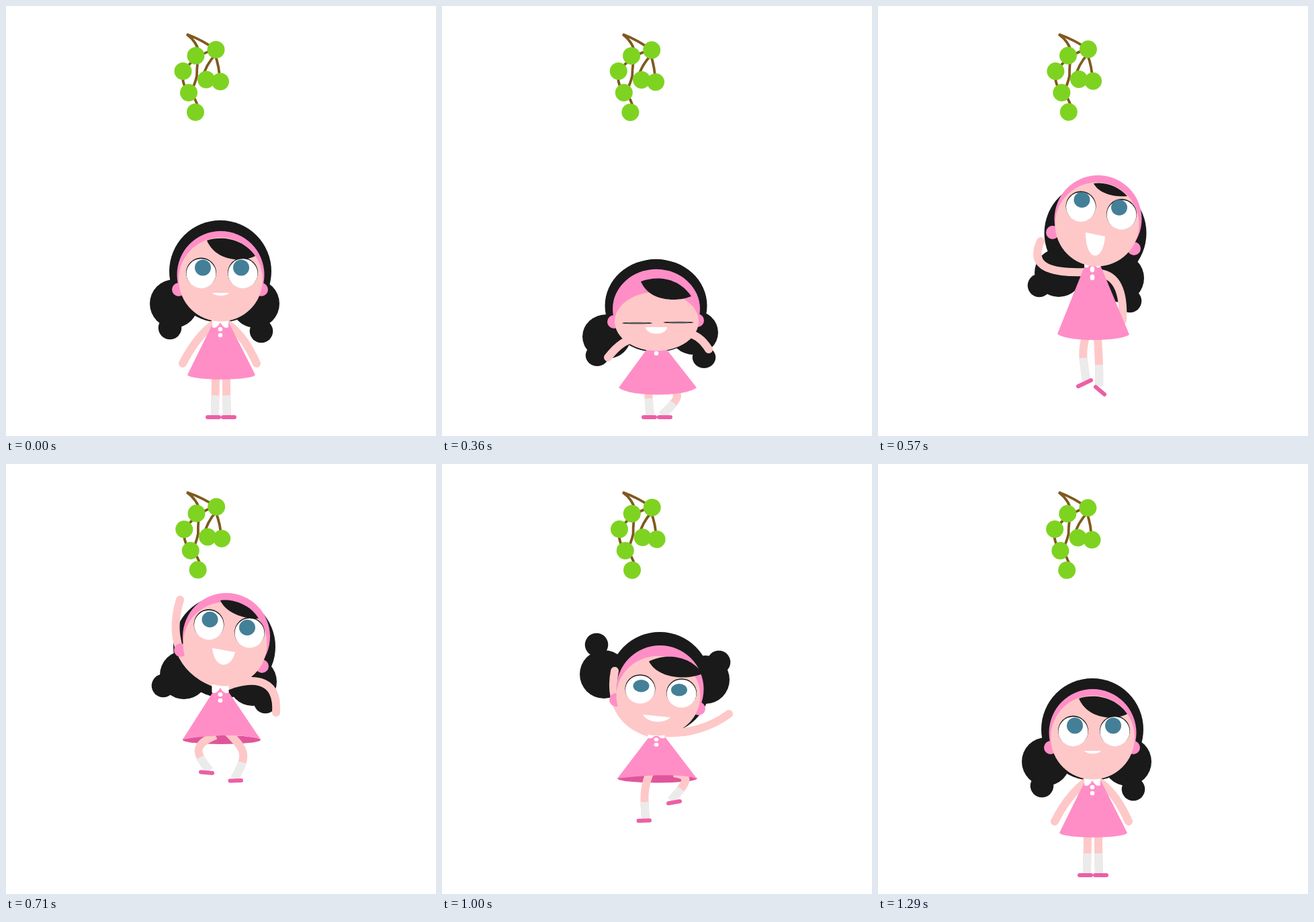
Animation of 640x640 px, one loop 1370 ms. Source, as an HTML page without scripts:

```html
<!DOCTYPE html>
<html lang="en">
<head>
<meta charset="utf-8">
<title>Jumping for grapes</title>
<style>
html, body { margin: 0; width: 100%; height: 100%; overflow: hidden; background: #fff }
svg { display: block; width: 100%; height: 100% }
svg [style] { animation: 1.37s steps(2) -5ms infinite }

.black { fill: #1a1a1a }
.pink { fill: #ff8ec6 }
.skin { fill: #fec8c8 }
.white { fill: #fff }
.iris { fill: #447f98 }
.limb { fill: none; stroke: #fec8c8; stroke-width: 12 }
.arm { stroke-linecap: round }
.sock { stroke: #ebebeb; stroke-dasharray: 100 100 }
.shoe { fill: none; stroke: #ec5fa6; stroke-width: 6; stroke-linecap: round }
.stem { fill: none; stroke: #80591f; stroke-width: 3.8 }
.berries { fill: #7ed321 }
.bunch { transform-origin: 270px 42px }

/* Poses: stand, half crouch (also landing), crouch, take-off, rise, top, fall */
@keyframes bunch {
  0%, to { rotate: 0deg } 10.22% { rotate: .5deg } 21.17%, 31.39% { rotate: .8deg }
  41.61% { rotate: -.9deg } 51.82%, 62.77% { rotate: -1.8deg } 72.99% { rotate: -.5deg }
  83.21%, 94.16% { rotate: .4deg }
}

/* Hair */
@keyframes hair {
  0%, 94.16%, to { translate: 319px 395px; scale: 1 1 }
  10.22%, 83.21% { translate: 319px 421px; scale: 1 .95 }
  21.17%, 31.39% { translate: 318.5px 446px; scale: 1 .91 }
  41.61% { translate: 323.5px 338px; scale: 1 1 }
  51.82% { translate: 325px 272px }
  62.77% { translate: 333px 261px }
  72.99% { translate: 324px 326px; scale: 1 1 }
}
@keyframes bunL {
  0%, 94.16%, to { translate: 250px 443px; scale: 1 1 }
  10.22%, 83.21% { translate: 250px 467px; scale: 1 .96 }
  21.17%, 31.39% { translate: 245px 492px; scale: 1 .92 }
  41.61% { translate: 269px 397px; scale: 1 1 }
  51.82% { translate: 265px 314px }
  62.77% { translate: 254px 228px }
  72.99% { translate: 241px 313px; scale: 1 1 }
}
@keyframes tipL {
  0%, 94.16%, to { translate: 244px 479px; scale: 1 1 }
  10.22%, 83.21% { translate: 238px 499px }
  21.17%, 31.39% { translate: 231px 520px; scale: 1 .92 }
  41.61% { translate: 240px 416px; scale: 1 1 }
  51.82% { translate: 234px 330px }
  62.77% { translate: 241px 201px }
  72.99% { translate: 230px 269px }
}
@keyframes bunR {
  0%, 94.16%, to { translate: 371px 443px; scale: 1 1 }
  10.22%, 83.21% { translate: 371px 465px; scale: 1 .96 }
  21.17%, 31.39% { translate: 375px 486px; scale: 1 .92 }
  41.61% { translate: 360px 405px; scale: 1 1 }
  51.82% { translate: 367px 324px }
  62.77% { translate: 404px 258px }
  72.99% { translate: 392px 321px; scale: 1 1 }
}
@keyframes tipR {
  0%, 94.16%, to { translate: 380px 484px; scale: 1 1 }
  10.22%, 83.21% { translate: 385px 504px }
  21.17%, 31.39% { translate: 390px 523px; scale: 1 .92 }
  41.61% { translate: 375px 439px; scale: 1 1 }
  51.82% { translate: 386px 354px }
  62.77% { translate: 428px 241px }
  72.99% { translate: 412px 295px }
}
@keyframes fringe {
  0%, 94.16%, to { d: path("M299 349C320 342 352 345 371 372C352 382 312 380 299 349") }
  10.22%, 83.21% { d: path("M298 379C320 371 352 374 371 402C351 411 310 410 298 379") }
  21.17%, 31.39% { d: path("M296 410C320 401 352 404 371 432C350 441 308 440 296 410") }
  41.61% { d: path("M321 264C340 261 360 270 371 283C352 285 328 279 321 264") }
  51.82% { d: path("M319 203C340 200 365 211 376 230C355 231 327 222 319 203") }
  62.77% { d: path("M323 224C345 217 380 225 390 250C365 257 331 250 323 224") }
  72.99% { d: path("M308 294C330 282 368 283 388 312C365 322 322 320 308 294") }
}

/* Face */
@keyframes band {
  0%, 94.16%, to { translate: 319.5px 400px; scale: 1 1 }
  10.22%, 83.21% { translate: 319.5px 427px; scale: 1 .96 }
  21.17%, 31.39% { translate: 319px 451px; scale: 1 .91 }
  41.61% { translate: 327.5px 317px; scale: 1 1 }
  51.82% { translate: 328px 257px }
  62.77% { translate: 330.5px 270px }
  72.99% { translate: 324.5px 335px; scale: 1 1 }
}
@keyframes face {
  0%, 94.16%, to { translate: 319.5px 407px; scale: 1 1 }
  10.22%, 83.21% { translate: 319.5px 440px; scale: 1 .85 }
  21.17%, 31.39% { translate: 319.5px 469.5px; scale: 1 .7 }
  41.61% { translate: 326px 325px; scale: 1 1 }
  51.82% { translate: 326px 268px }
  62.77% { translate: 326px 284px; scale: 1 1 }
  72.99% { translate: 322px 345px; scale: 1 .95 }
}
@keyframes ringL {
  0%, 94.16%, to { translate: 257px 422px }
  10.22%, 83.21% { translate: 257px 446px }
  21.17%, 31.39% { translate: 256px 470px }
  41.61% { translate: 260px 337px }
  51.82% { translate: 260px 277px }
  62.77% { translate: 262px 288px }
  72.99% { translate: 259px 351px }
}
@keyframes ringR {
  0%, 94.16%, to { translate: 380px 422px }
  10.22%, 83.21% { translate: 380px 445px }
  21.17%, 31.39% { translate: 380px 468px }
  41.61% { translate: 381px 361px }
  51.82% { translate: 381px 301px }
  62.77% { translate: 382px 318px }
  72.99% { translate: 382px 364px }
}
@keyframes eyeL {
  0%, 94.16%, to { translate: 290.5px 397.5px; scale: 1 1 }
  10.22%, 83.21% { translate: 290.5px 434px; scale: 1 .6 }
  21.17%, 31.39% { translate: 290.5px 472px; scale: 1 .06 }
  41.61% { translate: 302px 298.5px; scale: 1 1 }
  51.82% { translate: 302px 239px }
  62.77% { translate: 304px 260.5px; scale: 1 1 }
  72.99% { translate: 295px 335px; scale: 1 .95 }
}
@keyframes eyeR {
  0%, 94.16%, to { translate: 352.5px 397.5px; scale: 1 1 }
  10.22%, 83.21% { translate: 352.5px 434px; scale: 1 .6 }
  21.17%, 31.39% { translate: 352px 471px; scale: 1 .06 }
  41.61% { translate: 362.5px 310px; scale: 1 1 }
  51.82% { translate: 362.5px 251px }
  62.77% { translate: 363.5px 275px; scale: 1 1 }
  72.99% { translate: 356.5px 341px; scale: 1 .95 }
}
@keyframes ball {
  0%, 10.22%, 41.61%, to { scale: 1 1 }
  21.17%, 31.39% { scale: .8 .25 }
}
@keyframes iris {
  0%, 10.22%, 83.21%, 94.16%, to { translate: 1px -8px; scale: 1 1 }
  21.17%, 31.39% { translate: 0 -5px }
  41.61% { translate: 0 -10px }
  51.82% { translate: 0 -7.5px }
  62.77% { translate: 0 -5px; scale: 1 .95 }
  72.99% { translate: 0 -5px; scale: 1 .82 }
}
@keyframes mouth {
  0%, 94.16%, to { d: path("M307 427C311 432.5 328 432.5 332 427z") }
  10.22%, 83.21% { d: path("M305 453C307 461 331 461 334 453z") }
  21.17%, 31.39% { d: path("M303 478C304 491 334 491 335 478z") }
  41.61% { d: path("M309 337C309 382 335 382 338 343z") }
  51.82% { d: path("M307 274C310 306 335 306 341 280z") }
  62.77% { d: path("M305 296C311 317 331 321 342 306z") }
  72.99% { d: path("M299 373C306 386 331 387 340 377z") }
}

/* Dress */
@keyframes dress {
  0%, 94.16%, to { d: path("M309 470L331 470L371 549C366 558 275 558 270 549z") }
  10.22%, 83.21% { d: path("M307 492L332 492L375 558C363 570 278 570 267 558z") }
  21.17%, 31.39% { d: path("M304 512L335 512L379 568C362 582 280 582 263 568z") }
  41.61% { d: path("M308 386L331 386L374 489C360 500 280 500 267 488z") }
  51.82% { d: path("M312 333L327 333L379 410C355 401 300 403 263 410z") }
  62.77% { d: path("M310 349L330 349L380 415C360 400 310 406 261 414z") }
  72.99% { d: path("M309 405L331 405L380 469C360 460 300 463 261 468z") }
}
@keyframes lining {
  0%, 94.16%, to { translate: 320px 546px; scale: .8 .5 }
  10.22%, 83.21% { translate: 321px 555px; scale: .85 .5 }
  21.17%, 31.39% { translate: 321px 566px; scale: .9 .5 }
  41.61% { translate: 321px 486px; scale: .86 .5 }
  51.82% { translate: 321px 410.5px; scale: 1 1 }
  62.77% { translate: 320.5px 414px; scale: 1.02 1 }
  72.99% { translate: 320.5px 468px; scale: 1.02 1 }
}
@keyframes collar {
  0%, 94.16%, to { translate: 319px 481px; scale: 1 1 }
  10.22%, 83.21% { translate: 319px 495px; scale: 1 1 }
  21.17%, 31.39% { translate: 319px 508px; scale: 1 1 }
  41.61% { translate: 319px 392px; scale: 1 1.33 }
  51.82% { translate: 319px 343px; scale: 1.05 1 }
  62.77% { translate: 319px 356px; scale: 1.05 .9 }
  72.99% { translate: 319px 410px; scale: 1.05 .85 }
}

/* Limbs */
@keyframes armL {
  0%, 94.16%, to { d: path("M308 474C290 488 276 506 263 532") }
  10.22%, 83.21% { d: path("M307 493C288 495 274 502 258 533") }
  21.17%, 31.39% { d: path("M305 505C285 488 268 497 247 523") }
  41.61% { d: path("M308 396C250 398 226 385 242 350") }
  51.82% { d: path("M308 325C262 306 241 262 259 202") }
  62.77% { d: path("M308 344C262 318 250 270 265 209") }
  72.99% { d: path("M308 400C264 386 249 350 257 308") }
}
@keyframes armR {
  0%, 94.16%, to { d: path("M331 474C350 488 362 508 373 532") }
  10.22%, 83.21% { d: path("M333 490C352 490 366 492 382 525") }
  21.17%, 31.39% { d: path("M335 500C350 482 378 480 397 511") }
  41.61% { d: path("M331 398C358 402 366 430 364 468") }
  51.82% { d: path("M331 330C358 320 406 312 402 370") }
  62.77% { d: path("M333 342C360 333 400 333 427 346") }
  72.99% { d: path("M333 400C365 402 400 392 427 372") }
}
@keyframes legL {
  0%, 94.16%, to { d: path("M312 550C312 570 311 590 311 609"); stroke-dashoffset: -50px }
  10.22%, 83.21% { d: path("M308 555C306 570 308 595 311 609"); stroke-dashoffset: -50px }
  21.17%, 31.39% { d: path("M307 560C307 575 307 590 310 609"); stroke-dashoffset: -49px }
  41.61% { d: path("M309 492C303 515 305 525 310 557"); stroke-dashoffset: -49px }
  51.82% { d: path("M312 404C282 416 278 428 303 456"); stroke-dashoffset: -66px }
  62.77% { d: path("M312 402C280 414 285 432 299 461"); stroke-dashoffset: -70px }
  72.99% { d: path("M309 460C299 485 301 500 303 528"); stroke-dashoffset: -64px }
}
@keyframes legR {
  0%, 94.16%, to { d: path("M328 550C328 570 328 590 329 609"); stroke-dashoffset: -50px }
  10.22%, 83.21% { d: path("M331 560C340 570 338 592 328 609"); stroke-dashoffset: -50px }
  21.17%, 31.39% { d: path("M335 565C358 575 354 585 327 609"); stroke-dashoffset: -58px }
  41.61% { d: path("M327 492C328 515 330 540 329 566"); stroke-dashoffset: -57px }
  51.82% { d: path("M331 400C355 425 362 432 340 468"); stroke-dashoffset: -66px }
  62.77% { d: path("M340 402C375 412 372 424 344 455"); stroke-dashoffset: -67px }
  72.99% { d: path("M345 460C372 464 365 474 341 501"); stroke-dashoffset: -62px }
}
@keyframes shoeL {
  0%, 10.22%, 21.17%, 31.39%, 83.21%, 94.16%, to { d: path("M300 612L317 612") }
  41.61% { d: path("M298 566L317 557") }
  51.82% { d: path("M290 458.5L307 460") }
  62.77% { d: path("M287 460L303 464.5") }
  72.99% { d: path("M292.5 531L309 530.5") }
}
@keyframes shoeR {
  0%, 10.22%, 21.17%, 31.39%, 83.21%, 94.16%, to { d: path("M323 612L340 612") }
  41.61% { d: path("M324 567L337 578") }
  51.82% { d: path("M333.5 471.5L350 471") }
  62.77% { d: path("M341 457.5L358 453.5") }
  72.99% { d: path("M337 505L354 502") }
}
</style>
</head>
<body>
<svg viewBox="0 0 640 640">
  <g class="bunch" style="animation-name:bunch">
    <path class="stem" d="M269 42Q293 51 312 65Q285 70 264 97Q260 114 272 129M269 42Q285 54 288 72Q284 84 284 104Q281 118 274 129Q283 138 286 152M312 72Q297 88 293 106M311 72Q318 92 318 110"/>
    <g class="berries">
      <circle cx="312.5" cy="65" r="13"/>
      <circle cx="282.5" cy="74" r="13"/>
      <circle cx="263.5" cy="97" r="13"/>
      <circle cx="298" cy="109.5" r="13"/>
      <circle cx="319" cy="112.5" r="13"/>
      <circle cx="272" cy="129" r="13"/>
      <circle cx="282" cy="158" r="13"/>
    </g>
  </g>

  <g class="black">
    <circle r="76" style="animation-name:hair"/>
    <circle r="36" style="animation-name:bunL"/>
    <circle r="17.3" style="animation-name:tipL"/>
    <circle r="36" style="animation-name:bunR"/>
    <circle r="17.3" style="animation-name:tipR"/>
  </g>

  <ellipse rx="58" ry="6.5" fill="#e0559a" style="animation-name:lining"/>
  <path class="limb" style="animation-name:legL"/>
  <path class="limb sock" pathLength="100" style="animation-name:legL"/>
  <path class="limb" style="animation-name:legR"/>
  <path class="limb sock" pathLength="100" style="animation-name:legR"/>
  <path class="shoe" style="animation-name:shoeL"/>
  <path class="shoe" style="animation-name:shoeR"/>
  <path class="limb arm" style="animation-name:armL"/>
  <path class="limb arm" style="animation-name:armR"/>

  <path class="pink" style="animation-name:dress"/>
  <g class="white" style="animation-name:collar">
    <path d="M-12-15H12L12-3Q6 1 0-10Q-6 1-12-3z"/>
    <circle r="3.3"/>
    <circle cy="9" r="3.3"/>
  </g>

  <g class="pink">
    <circle r="10" style="animation-name:ringL"/>
    <circle r="10" style="animation-name:ringR"/>
    <circle r="65" style="animation-name:band"/>
  </g>
  <circle class="skin" r="62.5" style="animation-name:face"/>
  <path class="black" style="animation-name:fringe"/>
  <g style="animation-name:eyeL">
    <circle class="black" cy="-.4" r="22.5"/>
    <g style="animation-name:ball">
      <circle class="white" cy=".7" r="22"/>
      <circle class="iris" cx="1.5" r="12" style="animation-name:iris"/>
    </g>
  </g>
  <g style="animation-name:eyeR">
    <circle class="black" cy="-.4" r="22.5"/>
    <g style="animation-name:ball">
      <circle class="white" cy=".7" r="22"/>
      <circle class="iris" cx="-3.5" r="12" style="animation-name:iris"/>
    </g>
  </g>
  <path class="white" style="animation-name:mouth"/>
</svg>
</body>
</html>
```
